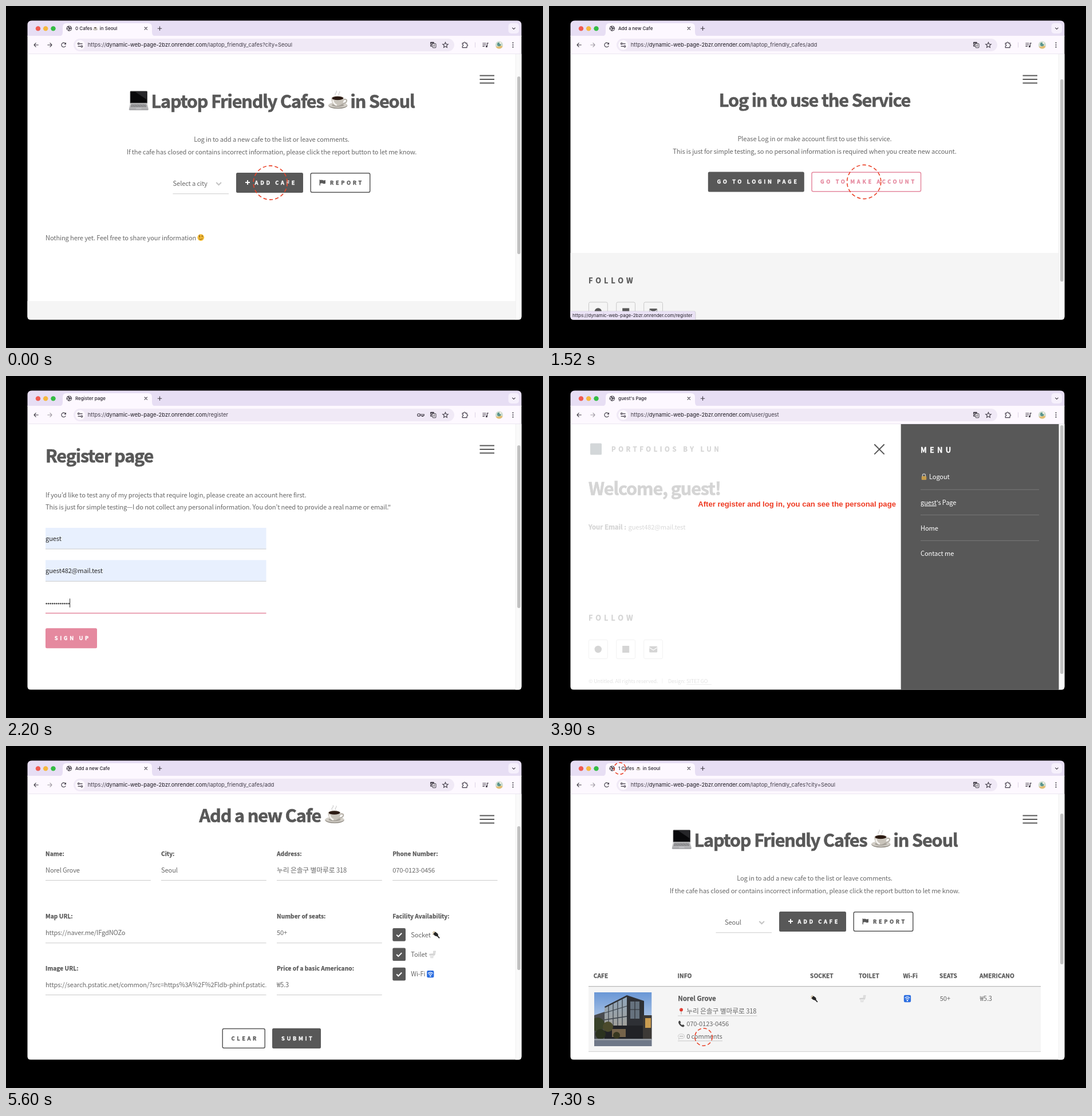
Recreate the animation shown at these times as an HTML page. Size 938x597 px, loop 8000 ms.

```html
<!DOCTYPE html>
<html lang="en">
<head>
<meta charset="utf-8">
<title>Cafe walkthrough</title>
<style>
html, body { margin: 0; width: 100%; height: 100%; overflow: hidden; background: #000; }
svg { display: block; width: 938px; height: 597px; }
text { font-family: 'Noto Sans CJK KR', 'Noto Sans CJK JP', 'Noto Sans CJK SC', 'Noto Sans CJK', sans-serif; white-space: pre; }
.p { font-size: 11.15px; letter-spacing: -.138px; fill: #696969; }
.small { font-size: 8.92px; letter-spacing: -.11px; fill: #696969; }
.dark { fill: #2c2c2c; }
.white { fill: #fff; }
.h { font-size: 30.6px; font-weight: 700; letter-spacing: -1.14px; fill: #585858; stroke: #585858; stroke-width: .7px; }
.l { font-size: 10.2px; font-weight: 700; letter-spacing: .04px; fill: #585858; stroke: #585858; stroke-width: .25px; }
.name { font-size: 11.4px; font-weight: 700; fill: #585858; stroke: #585858; stroke-width: .25px; }
.caps { font-weight: 700; stroke-width: .3px; }
.mid { text-anchor: middle; }
.ui { font-family: Inter, sans-serif; fill: #26222b; }
.tab { font-size: 8px; font-weight: 500; }
.url { font-size: 9.43px; }
.status { font-size: 8.05px; }
.note { font-family: 'Liberation Sans', Arial, sans-serif; font-size: 13.1px; font-weight: 700; fill: #ee3a22; }
.i { fill: none; stroke: #443f4a; stroke-width: 1.15; }
.ring { fill: none; stroke: #ea4228; stroke-width: 1.6; }
</style>
</head>
<body>
<svg id="stage" viewBox="0 0 938 597" xmlns="http://www.w3.org/2000/svg"></svg>
<script>
const INK = '#585858', PINK = '#e5899f', RULE = '#cbcbcb', BAR = '#fdf8ff';

const rect = (x, y, w, h, fill, r = 0, more = '') =>
  `<rect x="${x}" y="${y}" width="${w}" height="${h}" rx="${r}" fill="${fill}" ${more}/>`;
const line = (x1, x2, y, color = RULE, w = 1) =>
  `<path d="M${x1} ${y}H${x2}" stroke="${color}" stroke-width="${w}"/>`;
const path = (d, more) => `<path d="${d}" ${more}/>`;
const dot = (x, y, r, fill) => `<circle cx="${x}" cy="${y}" r="${r}" fill="${fill}"/>`;
const text = (x, y, s, cls = 'p', more = '') =>
  `<text x="${x}" y="${y}" class="${cls}" ${more}>${s}</text>`;
const caps = (x, y, s, size, gap, color = INK) =>
  text(x, y, s, 'caps', `font-size="${size}" letter-spacing="${gap}" fill="${color}" stroke="${color}"`);
const art = (id, x, y, size) =>
  `<use href="#${id}" transform="translate(${x} ${y}) scale(${size / 36})"/>`;
const ring = (x, y, r, dash) =>
  `<circle class="ring" cx="${x}" cy="${y}" r="${r}" stroke-dasharray="${dash}"/>`;
const hangul = s => `<tspan font-size="11.8">${s}</tspan>`;

function button(x, y, w, label, tx, fill, edge) {
  const box = edge
    ? rect(x + .75, y + .75, w - 1.5, 33.6, 'none', 2.5, `stroke="${edge}" stroke-width="1.5"`)
    : rect(x, y, w, 35.1, fill, 2.5);
  return box + caps(tx, y + 20.9, label, 9.3, 3.6, edge || '#fff');
}

// Pictograms, drawn around the origin in a 36 unit box
const defs = `<defs>
<clipPath id="window"><path d="M45 25.5H893Q900.4 25.5 900.4 33V542Q900.4 547.5 895 547.5H43Q37.5 547.5 37.5 542V33Q37.5 25.5 45 25.5Z"/></clipPath>
<clipPath id="field"><rect x="69" y="400" width="385.5" height="34"/></clipPath>
<clipPath id="photo"><rect x="79" y="430" width="100.5" height="94"/></clipPath>
<linearGradient id="sky" x2="0" y2="1"><stop stop-color="#6a97d6"/><stop offset=".8" stop-color="#d3e0ef"/></linearGradient>
<linearGradient id="glass" x2="0" y2="1"><stop stop-color="#8fa6bd"/><stop offset="1" stop-color="#a89c8a"/></linearGradient>
<linearGradient id="metal" x2="0" y2="1"><stop stop-color="#d2d2d3"/><stop offset="1" stop-color="#a3a3a6"/></linearGradient>
<g id="laptop">
  <path d="M-14-17H14Q15.5-17 15.5-15.5V5H-15.5V-15.5Q-15.5-17-14-17Z" fill="#28282a"/>
  <path d="M-14-15.5H14V3.5H-14Z" fill="#08080a"/><path d="M-6-15.5H14V-2Z" fill="#262629"/>
  <path d="M-15.5 5H15.5L17.5 16Q17.5 17.5 16 17.5H-16Q-17.5 17.5-17.5 16Z" fill="url(#metal)"/>
  <path d="M-13.4 7H13.4M-13.8 9H13.8M-14.3 11H14.3" stroke="#6b6b6e" stroke-width="1.3" stroke-dasharray="2 .6"/>
  <path d="M-4.5 12.7H4.5L5 16H-5Z" fill="#bcbcbf"/>
</g>
<g id="cup">
  <path d="M-4-9C-8-12 0-13-3-17M2-9C-1-12 5-13 3-16" fill="none" stroke="#d2d2d2" stroke-width="1.3"/>
  <ellipse cy="9.6" rx="17" ry="5.6" fill="#8f8a82"/><ellipse cy="8.6" rx="16.8" ry="4.9" fill="#d3cfc8"/>
  <ellipse cy="8.8" rx="11" ry="3" fill="#a8a39b"/>
  <path d="M10-1C18-4 18 5 8 6" fill="none" stroke="#b5b0a7" stroke-width="2.2"/>
  <path d="M-12-4C-12 6-7 10-1 10S11 6 11-4Z" fill="#c9c4bb"/>
  <path d="M-9 0C-8 6-5 8-2 9" fill="none" stroke="#f4f2ee" stroke-width="2.8"/>
  <ellipse cx="-.5" cy="-4" rx="11.5" ry="4.2" fill="#e9e6e1"/><ellipse cx="-.5" cy="-3.6" rx="10.3" ry="3.4" fill="#2c1b13"/>
</g>
<g id="wink">
  <circle r="17" fill="#f6be38"/><ellipse cx="-6" cy="-4" rx="2.4" ry="3.6" fill="#5b3a14"/>
  <path d="M3-4Q7-7 11-3M-9 6Q0 14 9 5M-10-11L-4-12M4-11L10-9" fill="none" stroke="#5b3a14" stroke-width="2.4"/>
</g>
<g id="lock"><path d="M-8 0V-7A8 8 0 0 1 8-7V0" fill="none" stroke="#c9c9c9" stroke-width="4"/>
  <rect x="-13" y="-2" width="26" height="19" rx="3" fill="#d0a553"/><path d="M-13 5H13M-13 11H13" stroke="#ac8233" stroke-width="1.6"/></g>
<g id="plug"><path d="M-16-8L-7-16M-16 0L-4-12" stroke="#b8a070" stroke-width="3"/>
  <path d="M-13-3L-3-14L9-4Q13 4 8 9Q0 8-6 5Z" fill="#262626"/><path d="M7 6L17 17" stroke="#262626" stroke-width="5"/></g>
<g id="toilet"><path d="M5-16H16L12 3H3Z" fill="#dfdfdf" stroke="#bcbcbc"/>
  <path d="M-15 0H11Q9 9 2 10L4 17H-9L-8 9Q-14 7-15 0Z" fill="#e9e9e9" stroke="#bababa"/><ellipse cx="-3" cy="0" rx="12" ry="3" fill="#cfcfcf"/></g>
<g id="wifi"><rect x="-17" y="-17" width="34" height="34" rx="6" fill="#2c6ee0"/>
  <path d="M-12-3Q0-14 12-3M-7.5 3Q0-4 7.5 3" fill="none" stroke="#fff" stroke-width="3.4"/><circle cy="9" r="3.4" fill="#fff"/></g>
<g id="pin"><path d="M0 0V17" stroke="#9a9a9a" stroke-width="3"/><circle cy="-8" r="9" fill="#df3429"/><circle cx="-3" cy="-11" r="2.6" fill="#f58a80"/></g>
<g id="phone"><path d="M-15-12L-9-17L-2-8L-6-3Q-2 4 4 7L9 3L17 10L12 16C0 18-18 1-15-12Z" fill="#444"/></g>
<g id="bubble"><path d="M0-13C22-13 22 11 0 11Q-4 11-7 10L-15 15L-12 7C-22 0-16-13 0-13Z" fill="#f4f4f4" stroke="#b4b4b4" stroke-width="2"/>
  <path d="M-8-1H9" stroke="#8a8a8a" stroke-width="4" stroke-dasharray="4 2.5"/></g>
</defs>`;

function chrome() {
  const arrow = 'M-3.8 0H4M-3.8 0L-.2-3.6M-3.8 0L-.2 3.6';
  return rect(37, 25, 864, 28, '#e7def4') +
    dot(56, 39.4, 4.2, '#f15a50') + dot(69.2, 39.4, 4.2, '#f5b83d') + dot(82.5, 39.4, 4.2, '#35bd45') +
    path('M92 53Q99 53 99 46V37Q99 30 106 30H248Q255 30 255 37V46Q255 53 262 53Z', `fill="${BAR}"`) +
    rect(37, 52, 864, 31.5, BAR) + line(37, 901, 83.5, '#ece6f1') +
    dot(110.3, 39.2, 4.8, '#55515a') +
    path('M106.6 37.6Q109.5 38.5 109 40.5T106.7 41.2M110.5 35Q110.5 37.6 113.6 37.2M111.5 43Q110.5 40.8 114 40.4', `fill="none" stroke="${BAR}" stroke-width="1.1"`) +
    path('M241.8 36.7L246.8 41.7M246.8 36.7L241.8 41.7M268.5 35.5V42.9M264.8 39.2H272.2', 'class="i"') +
    rect(877.5, 30, 18.5, 18, '#f6f0fc', 5) + path('M884.3 37.9L886.9 40.5L889.5 37.9', 'class="i" stroke-width="1.4"') +
    path(arrow, 'class="i" transform="translate(52.7 68)"') +
    path('M104 66A3.8 3.8 0 1 0 104.2 69.4M104.4 64V66.7H101.7', 'class="i"') +
    rect(118, 57, 665, 22, '#f0e9f6', 11) + dot(129.6, 68, 8.6, BAR) +
    path('M128.8 65.8H133.6M125.6 70.4H130.4', 'class="i"') +
    `<circle class="i" cx="126.8" cy="65.8" r="1.4"/><circle class="i" cx="132.3" cy="70.4" r="1.4"/>` +
    rect(741, 62.8, 6.8, 8, '#443f4a', 1) + rect(745, 65.5, 6, 7.4, BAR, 1, 'stroke="#443f4a"') +
    path('M746.2 68H750M748 67V68Q748 70.5 746.3 71.5M746.8 69.3L749.7 71.5', 'fill="none" stroke="#443f4a" stroke-width=".7"') +
    path('M744.4 65.3A2 2 0 1 0 746 67H744.4', `fill="none" stroke="${BAR}" stroke-width=".8"`) +
    path('M767.5 63.4L768.9 66.5L772.2 66.8L769.7 69L770.4 72.3L767.5 70.6L764.6 72.3L765.3 69L762.8 66.8L766.1 66.5Z', 'class="i" stroke-width="1"') +
    path('M797.2 64.8H799.5Q799.5 63 801 63T802.5 64.8H805V67.2Q806.6 67.2 806.6 68.6T805 70V72.6H797.2V70Q798.8 70 798.8 68.6T797.2 67.2Z', 'class="i"') +
    path('M819.5 63.5V72.5', 'stroke="#dcd3e6" stroke-width="1"') +
    path('M832.4 65H838.5M832.4 67.7H838.5M832.4 70.4H836M840.5 70.5V64.8H842.8', 'class="i"') + dot(839.4, 70.7, 1.6, '#443f4a') +
    dot(861.5, 68, 6.6, '#cfdcd0') + path('M855.5 70.5Q861 72 864 69L867.5 70.8A6.6 6.6 0 0 1 855.5 70.5Z', 'fill="#e3bd72"') +
    dot(861.2, 67, 3.2, '#5b958c') + dot(863.5, 64.8, 1.7, '#f2efe4') +
    [64.3, 68, 71.7].map(y => dot(885.5, y, 1.1, '#443f4a')).join('');
}

function frame(title, route, thumb, canForward = false) {
  return rect(37, 84, 864, 464, '#fff') +
    rect(890, 84, 11, 464, '#fafafa') + path('M890.3 84V548', 'stroke="#ececec" stroke-width=".8"') +
    rect(893, thumb[0], 5.6, thumb[1] - thumb[0], '#c2c2c2', 2.8) +
    chrome() + title +
    path('M72.4 68H80.2M80.2 68L76.6 64.4M80.2 68L76.6 71.6', `class="i" opacity="${canForward ? 1 : .5}"`) +
    text(142.8, 71.3, `https://<tspan fill="#1d1a22">dynamic-web-page-2bzr.onrender.com</tspan>/${route}`, 'ui url', 'style="fill:#423d49"');
}

const tab = s => text(121, 42, s, 'ui tab');
const cafeTab = n => tab(n + ' Cafes') + art('cup', 156, 38.8, 8) + text(163.8, 42, 'in Seoul', 'ui tab');
const burger = [121.5, 128, 134.5].map(y => line(827.5, 853, y, INK, 1.8)).join('');
const footer = y => rect(37, y, 853, 548 - y, '#f5f5f5');

function listHead(dy, city, cx, cy) {
  return `<g transform="translate(0 ${dy})">` +
    art('laptop', 231.8, 165, 35) + text(253.5, 177.7, 'Laptop Friendly Cafes', 'h') +
    art('cup', 579.8, 164.5, 35) + text(601.6, 177.7, 'in Seoul', 'h') +
    text(464, 237.4, 'Log in to add a new cafe to the list or leave comments.', 'p mid') +
    text(464, 259.4, 'If the cafe has closed or contains incorrect information, please click the report button to let me know.', 'p mid') +
    text(cx, cy, city) + path('M367.3 308L371.6 312.3L375.9 308', 'fill="none" stroke="#c4c4c4" stroke-width="2"') +
    line(291.5, 389, 327.8) +
    button(402, 291, 117, 'ADD CAFE', 434.6, INK) + path('M422 304V312M418 308H426', 'stroke="#fff" stroke-width="1.9"') +
    button(531.5, 291, 105, 'REPORT', 566, '', INK) +
    path('M548.3 303.3V313.3', `stroke="${INK}" stroke-width="1.4"`) +
    path('M549 304Q551.5 302.8 553.5 304T558 303.7V309.8Q555.5 311 553.5 309.8T549 310Z', `fill="${INK}"`) + '</g>';
}

function follow(y) {
  const boxes = [69.5, 117.7, 165.7].map(x =>
    rect(x, y + 38, 32.8, 33, 'none', 2.5, 'stroke="#c9c9c9"')).join('');
  const m = y + 54.5;
  return caps(69, y + 4.6, 'FOLLOW', 12.7, 5) + boxes +
    dot(85.8, m, 6.2, INK) + rect(128.2, m - 6, 12, 12, INK) +
    rect(175.2, m - 5.2, 14, 10.6, INK, 1.5) +
    path(`M175.2 ${m - 3}L182.2 ${m + 1.6}L189.2 ${m - 3}`, 'fill="none" stroke="#f5f5f5" stroke-width="1.2"');
}

function emptyList() {
  return frame(cafeTab(0), 'laptop_friendly_cafes?city=Seoul', [123, 433], true) + burger +
    listHead(0, 'Select a city', 291.6, 313.8) +
    text(69, 408.5, 'Nothing here yet. Feel free to share your information') + art('wink', 340.3, 404.2, 12.4) +
    footer(515) + ring(461.7, 308.5, 29.6, '6.3 4.2');
}

function loginGate() {
  return frame(tab('Add a new Cafe'), 'laptop_friendly_cafes/add', [128, 481]) + burger +
    text(464, 176, 'Log in to use the Service', 'h mid') +
    text(464, 236, 'Please Log in or make account first to use this service.', 'p mid') +
    text(464, 257.8, 'This is just for simple testing, so no personal information is required when you create new account.', 'p mid') +
    button(277.8, 289.5, 168, 'GO TO LOGIN PAGE', 293.4, INK) +
    button(458.3, 289.5, 192, 'GO TO MAKE ACCOUNT', 474, '', PINK) +
    footer(431) + follow(479) +
    path('M37 533H252Q255.5 533 255.5 536.5V548H37Z', 'fill="#c9c3d0" opacity=".6" transform="translate(1 -.7)"') +
    path('M37 533H252Q255 533 255 536V548H37Z', 'fill="#eae2f5"') +
    text(41, 543, 'https://dynamic-web-page-2bzr.onrender.com/register', 'ui status') +
    ring(550.2, 307, 29.6, '6.3 4.2');
}

function register() {
  const bullets = Array.from({ length: 12 }, (_, k) => dot(70.7 + k * 3.55, 397.3, 1.35, '#4a4a4a')).join('');
  const filled = (y, s) => rect(69, y, 385.5, 37, '#e8f0fe') + line(69, 454.5, y + 37) + text(69, y + 23.1, s, 'p dark');
  return frame(tab('Register page'), 'register', [121, 405]) + burger +
    `<circle class="i" cx="721" cy="68" r="2.3"/>` + path('M723.2 67H730.3V69H728.6V70.3H726.6V69H723.3', 'class="i" stroke-width="1"') +
    text(69, 151.3, 'Register page', 'h') +
    text(69, 211.5, 'If you’d like to test any of my projects that require login, please create an account here first.') +
    text(69, 233.3, 'This is just for simple testing—I do not collect any personal information. You don’t need to provide a real name or email."') +
    filled(265, 'guest') + filled(321.3, 'guest482@mail.test') + bullets +
    path('M111.6 388.5V404', 'stroke="#333" stroke-width="1"') + line(69, 454.5, 414, PINK, 1.4) +
    button(69, 440.2, 90, 'SIGN UP', 84.8, PINK);
}

function profile() {
  const item = (x, y, s) => text(x, y, s, 'p white');
  const split = y => line(649, 856, y, '#7c7c7c', .9);
  return frame(tab("guest's Page"), 'user/guest', [86, 520]) +
    '<g opacity=".25">' + rect(72, 117.5, 20, 20, '#50626a', 1.5) +
    caps(109, 132.2, 'PORTFOLIOS BY LUN', 11.4, 4.55) +
    text(69, 207.8, 'Welcome, guest!', 'h') +
    text(69, 267.8, 'Your Email :', 'name') + text(138.5, 267.8, 'guest482@mail.test') +
    follow(422.5) +
    '<g opacity=".75">' + text(69, 535.7, '© Untitled. All rights reserved.', 'small') +
    path('M198 528V536.5', 'stroke="#aaa" stroke-width=".8"') +
    text(208, 535.7, 'Design:', 'small') + text(240, 535.7, 'SITE7 GO', 'small') + line(240, 284, 538.5, '#888', .8) + '</g></g>' +
    path('M568.3 119.2L585.7 136.6M585.7 119.2L568.3 136.6', `stroke="${INK}" stroke-width="2"`) +
    rect(614.7, 84, 275.8, 464, INK) + caps(649, 133.6, 'MENU', 12.7, 5.2, '#fff') +
    art('lock', 655, 175.7, 11.5) + item(664, 180.3, 'Logout') + split(198.3) +
    item(649, 225.2, '<tspan text-decoration="underline">guest</tspan>\'s Page') + split(242.6) +
    item(649, 269.9, 'Home') + split(287.4) + item(649, 314.2, 'Contact me') +
    text(260.3, 228, 'After register and log in, you can see the personal page', 'note');
}

function addForm() {
  const entry = (x, y, w, label, value) =>
    text(x, y, label, 'l') + text(x, y + 29, value) + line(x, x + w, y + 43);
  const check = (y, label, id, ix) => rect(675.3, y, 22.7, 22.7, INK, 2.2) +
    path(`M682.2 ${y + 11.6}L685.3 ${y + 14.7}L691.2 ${y + 8.7}`, 'fill="none" stroke="#fff" stroke-width="2"') +
    text(707.3, y + 15.6, label) + art(id, ix, y + 11.3, 13);
  return frame(tab('Add a new Cafe'), 'laptop_friendly_cafes/add', [140, 391]) + burger +
    text(337.6, 133, 'Add a new Cafe', 'h') + art('cup', 574, 120, 35) +
    entry(69, 191.5, 183.8, 'Name:', 'Norel Grove') + entry(271, 191.5, 183.8, 'City:', 'Seoul') +
    entry(473, 191.5, 183.8, 'Address:', hangul('누리 은솔구 별마루로 ') + '318') +
    entry(675.2, 191.5, 183.3, 'Phone Number:', '070-0123-0456') +
    entry(69, 300.8, 385.5, 'Map URL:', 'https://naver.me/IFgdNOZo') +
    entry(473, 300.8, 183.8, 'Number of seats:', '50+') +
    entry(69, 391.5, 385.5, 'Image URL:', '') +
    '<g clip-path="url(#field)">' + text(69, 420.5, 'https://search.pstatic.net/common/?src=https%3A%2F%2Fldb-phinf.pstatic.') + '</g>' +
    entry(473, 391.5, 183.8, 'Price of a basic Americano:', '₩5.3') +
    text(675.2, 300.8, 'Facility Availability:', 'l') +
    check(318, 'Socket', 'plug', 751) + check(352.4, 'Toilet', 'toilet', 744.8) + check(386.8, 'Wi-Fi', 'wifi', 741.3) +
    button(377.5, 492.8, 75.5, 'CLEAR', 393.5, '', INK) + button(465, 492.8, 85, 'SUBMIT', 481, INK);
}

function photo() {
  const panes = [104, 112, 120, 128].map(x => `M${x} ${453 - (x - 104) * .45}V490`).join('');
  return '<g clip-path="url(#photo)">' + rect(79, 430, 100.5, 94, 'url(#sky)') +
    path('M79 470L97 464V512H79Z', 'fill="#4a4c50"') +
    path('M97 455L136 436V512H97Z', 'fill="url(#glass)"') +
    path(panes + 'M97 466L136 454M97 478L136 472', 'fill="none" stroke="#3c434c" stroke-width="1.3"') +
    path('M97 455L136 435L166 445V512H136V438L98 457Z', 'fill="#2e3035"') +
    rect(142, 446, 16, 30, '#66727e') + path('M150 446V476M142 460H158', 'stroke="#2e3035" stroke-width="1.2"') +
    rect(97, 488, 82, 23, '#212226') + rect(110, 494, 24, 14, '#75634a') +
    rect(164, 470, 16, 42, '#3c3936') + rect(168, 475, 10, 17, '#c99c50') +
    dot(85, 486, 12, '#39422a') + dot(103, 490, 9, '#4b4a2c') + dot(90, 503, 9, '#2b321f') + dot(118, 505, 6, '#37371f') +
    rect(79, 511, 101, 13, '#6f7888') + line(79, 180, 512.5, '#9ea2a8', 2) + '</g>';
}

function filledList() {
  const heads = [[77.8, 'CAFE'], [224.6, 'INFO'], [456, 'SOCKET'], [541, 'TOILET'], [618.5, 'Wi-Fi'], [682, 'SEATS'], [752, 'AMERICANO']];
  return frame(cafeTab(1), 'laptop_friendly_cafes?city=Seoul', [118, 381]) + burger +
    listHead(-2, 'Seoul', 307, 313.8) +
    heads.map(([x, s]) => text(x, 404.8, s, 'l')).join('') +
    rect(69, 420, 790, 113, '#f5f5f5') + line(69, 859, 419.6, '#b9b9b9', 1.4) + line(69, 859, 533.4, '#cfcfcf') +
    photo() + text(225.2, 445.4, 'Norel Grove', 'name') +
    art('pin', 231, 463, 11.5) + text(240.2, 467.3, hangul('누리 은솔구 별마루로 ') + '318') + line(225, 363.5, 471, '#c4c4c4', .9) +
    art('phone', 231.2, 485, 12) + text(240.2, 489.3, '070-0123-0456') +
    art('bubble', 231.2, 507, 12) + text(240.2, 511.2, '0 comments') + line(225, 303, 514.8, '#c4c4c4', .9) +
    art('plug', 463, 441, 12.5) + art('toilet', 547.7, 440.8, 12.5) + art('wifi', 626, 441, 13) +
    text(682.8, 445.3, '50+') + text(752.8, 445.3, '₩5.3') +
    ring(123.6, 39.2, 10.2, '5.6 3.7') + ring(270, 508, 15.2, '6.2 3.9');
}

const LOOP = 8000;
const starts = [0, 500, 2200, 3900, 5600, 7300];
const scenes = [emptyList, loginGate, register, profile, addForm, filledList];

const stage = document.getElementById('stage');
stage.innerHTML = defs + rect(0, 0, 938, 597, '#000') + '<g clip-path="url(#window)">' +
  scenes.map(s => `<g class="scene" display="none">${s()}</g>`).join('') + '</g>';
const layers = [...stage.querySelectorAll('.scene')];

function draw(t) {
  const now = starts.filter(s => s <= t).length - 1;
  layers.forEach((g, k) => g.setAttribute('display', k === now ? 'inline' : 'none'));
}

const origin = performance.now();
function tick() {
  draw((performance.now() - origin) % LOOP);
  requestAnimationFrame(tick);
}
draw(0);
requestAnimationFrame(tick);
</script>
</body>
</html>
```
